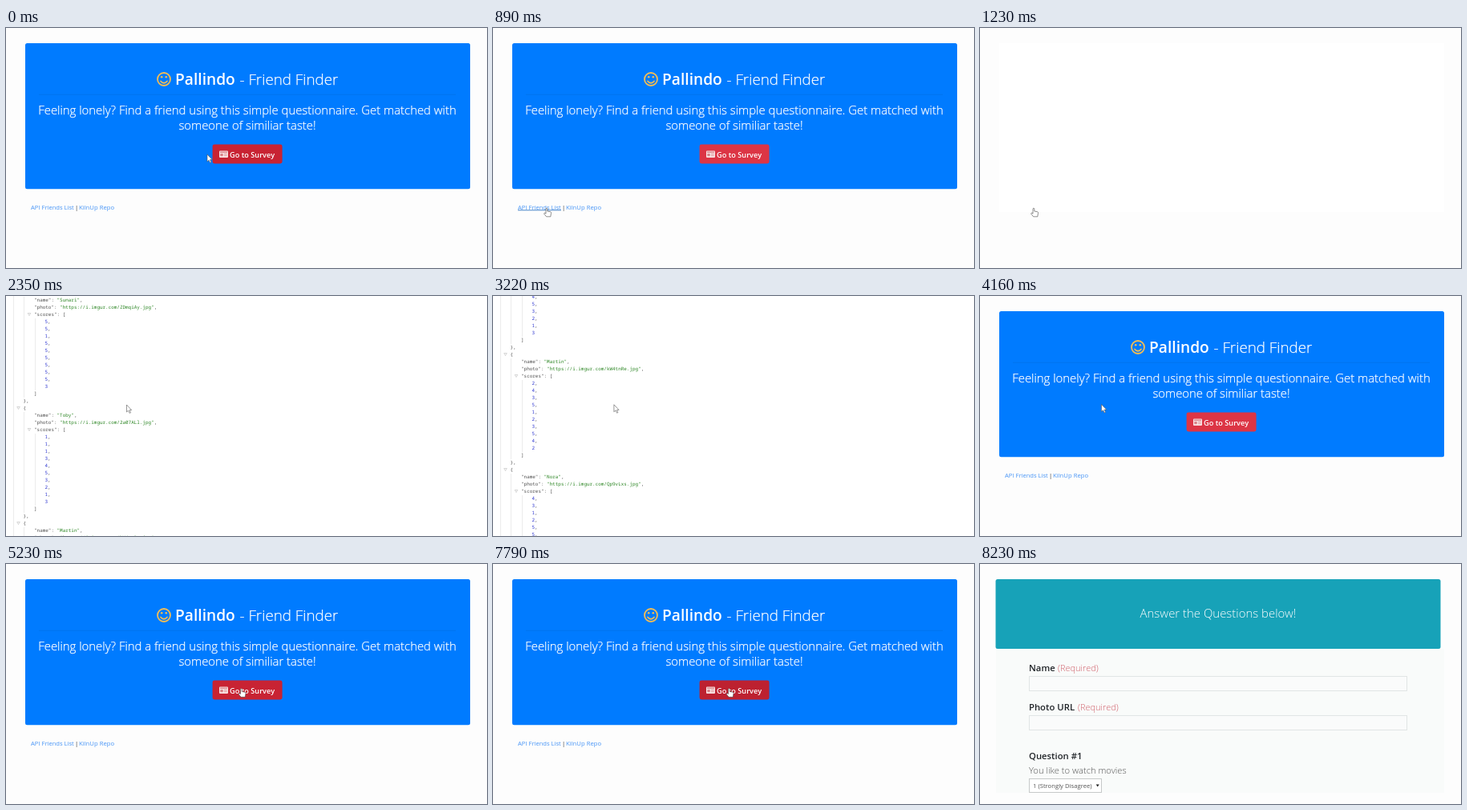
Write an HTML page that moves like this. It is 600 px wide and 300 px high and loops after 8.6 s.

```html
<!DOCTYPE html>
<html lang="en">
<head>
<meta charset="utf-8">
<title>Friend finder demo</title>
<style>
  html, body { margin: 0; width: 100%; height: 100%; overflow: hidden; background: #fdfdfd; }
  svg { display: block; width: 100%; height: 100%; }
  text { font-family: "Open Sans", "Noto Sans", sans-serif; white-space: pre; }
  .mono text {
    font-family: "Noto Sans Mono", "DejaVu Sans Mono", monospace;
    font-size: 5.95px; fill: #505050; text-rendering: geometricPrecision;
  }
  .s { fill: #2b8523; }
  .n { fill: #2c35cf; }
</style>
</head>
<body>
<svg id="stage" viewBox="0 0 600 300"></svg>
<script>
const LOOP = 8600;
const PAGE = '#fdfdfd';
const LINK = '#4694f6';

const rect = (x, y, w, h, fill, extra = '') =>
  `<rect x="${x}" y="${y}" width="${w}" height="${h}" fill="${fill}" ${extra}/>`;
const text = (x, y, size, weight, fill, str, anchor = 'start') =>
  `<text x="${x}" y="${y}" font-size="${size}" font-weight="${weight}" fill="${fill}" text-anchor="${anchor}">${str}</text>`;
const group = (id, body, extra = '') => `<g id="${id}" ${extra}>${body}</g>`;

function homePage() {
  const smiley =
    `<g fill="none" stroke="#f3bd55" stroke-width="1.8" stroke-linecap="round">
      <circle cx="197" cy="64" r="8"/><path d="M193 66.5Q197 71 201 66.5"/></g>
     <g fill="#f3bd55"><circle cx="194.2" cy="61.2" r="1.3"/><circle cx="199.8" cy="61.2" r="1.3"/></g>`;
  const icon =
    rect(266, 153.5, 11, 8.5, '#f8e4e4', 'rx="1"') +
    rect(267, 154.5, 9, 1.4, '#d98288') +
    rect(267.3, 157, 3.4, 3.2, '#d98288') +
    rect(272, 157, 3.7, .8, '#d98288') +
    rect(272, 159.3, 3.7, .8, '#d98288');
  const intro =
    text(291.5, 71, 18.8, 300, '#fff', '- Friend Finder') +
    text(301, 107.5, 14.9, 300, '#fff', 'Feeling lonely? Find a friend using this simple questionnaire. Get matched with', 'middle') +
    text(301, 126.5, 14.9, 300, '#fff', 'someone of similiar taste!', 'middle');
  return rect(0, 0, 600, 300, PAGE) +
    rect(24, 19, 555, 182.2, '#007bff', 'rx="2.5"') + smiley +
    text(211, 71, 19.2, 600, '#fff', 'Pallindo') +
    rect(41, 82.8, 520, .7, '#000', 'opacity=".1"') +
    group('intro', intro, 'stroke="#fff" stroke-width=".25"') +
    rect(257.6, 145.6, 87, 23.9, '#c82333', 'rx="2.4" id="button"') + icon +
    text(279, 161.5, 9.2, 600, '#fff', 'Go to Survey') +
    text(31, 226.5, 7.6, 400, LINK, 'API Friends List') +
    text(86, 226.5, 7.6, 400, '#333', '|') +
    text(91, 226.5, 7.7, 400, LINK, 'KilnUp Repo') +
    rect(31, 227.5, 54, .7, '#0056b3', 'id="underline"');
}

function blankPage() {
  return rect(0, 0, 600, 300, PAGE) + rect(24, 19, 555, 211, '#fff');
}

const friends = [
  ['Ned', 'bS8gqKu', '5144512541'],
  ['Sunari', 'ZDmqiAy', '5515555553'],
  ['Toby', '2a07ALl', '1113453213'],
  ['Martin', 'kW4tnRe', '2435123542'],
  ['Nora', 'Qp9vLxs', '4312554213'],
  ['Elin', 'u7HcDyo', '3521442351']
];

function jsonPage() {
  const line = (x, y, body) => `<text x="${x}" y="${y + 2.4}">${body}</text>`;
  const str = s => `<tspan class="s">"${s}"</tspan>`;
  const fold = (x, y) =>
    `<path d="M${x - 1.8} ${y - 1.5}h3.6l-1.8 3z" fill="none" stroke="#bbb" stroke-width=".6"/>`;
  const guide = (x, y, h) => rect(x, y, .7, h, '#e4e4e4');

  let out = guide(9, 7, 900) + line(8, 2, '[') + fold(2, 2);
  friends.forEach(([name, photo, scores], i) => {
    const y = 11 + i * 144;
    out += guide(22, y + 5, 126) + guide(36, y + 32, 90) +
      fold(15.5, y) + fold(29, y + 27) +
      line(21.5, y, '{') +
      line(35, y + 9, `"name": ${str(name)},`) +
      line(35, y + 18, `"photo": ${str('https://i.imgur.com/' + photo + '.jpg')},`) +
      line(35, y + 27, '"scores": [');
    [...scores].forEach((n, k) => {
      out += line(48.5, y + 36 + k * 9, `<tspan class="n">${n}</tspan>${k < 9 ? ',' : ''}`);
    });
    out += line(35, y + 126, ']') + line(21.5, y + 135, '},');
  });
  const tabs =
    rect(511.5, -2, 40.5, 12, '#f4f4f4', 'stroke="#c4c4c4" stroke-width=".8" rx="1"') +
    rect(552, -2, 40, 12, '#dcdcdc', 'stroke="#b8b8b8" stroke-width=".8" rx="1"') +
    text(531.5, 7, 6.2, 400, '#444', 'Raw', 'middle') +
    text(571.5, 7, 6.2, 400, '#444', 'Parsed', 'middle');
  return rect(0, 0, 600, 300, '#fff') +
    group('scroll', group('lines', out, 'class="mono"') + tabs);
}

function surveyPage() {
  const input = y => rect(61.5, y, 471, 18, '#fafbfb', 'stroke="#e1e5e5"');
  const label = (y, str, reqX) =>
    text(61, y, 11.3, 600, '#212529', str) +
    (reqX ? text(reqX, y, 11, 300, '#d0606a', '(Required)') : '');
  return rect(0, 0, 600, 300, PAGE) +
    rect(20, 106, 559, 180, '#f9fbfa') +
    rect(19.5, 19, 555, 87, '#17a2b8', 'rx="2.5"') +
    text(297, 67, 14.95, 300, '#fff', 'Answer the Questions below!', 'middle') +
    label(134, 'Name', 97) + input(140.5) +
    label(183, 'Photo URL', 122) + input(189.5) +
    label(244, 'Question #1') +
    text(61, 262, 11.2, 300, '#555', 'You like to watch movies') +
    rect(61.5, 268.5, 90, 17, '#fff', 'stroke="#c6c9c9"') +
    text(66, 279.8, 7.7, 400, '#555', '1 (Strongly Disagree)') +
    `<path d="M144.7 275.5h4l-2 3z" fill="#222"/>`;
}

const arrow =
  '<path d="M0 0V9L2.1 7.2L3.6 10.4L5 9.8L3.6 6.6H6.2Z" fill="#fff" stroke="#555" stroke-width=".6"/>';
const hand =
  `<path d="M0 .8Q.9-.6 1.8 .8V4L5.6 4.7Q6.8 5 6.5 6.4L5.8 10.8H.6L-2.2 7.4Q-2.4 6-1.2 6.2L0 7Z"
    fill="#fff" stroke="#444" stroke-width=".6"/>`;

document.getElementById('stage').innerHTML =
  group('home', homePage()) + group('blank', blankPage()) +
  group('json', jsonPage()) + group('survey', surveyPage()) +
  group('cursor', group('arrow', arrow) + group('hand', hand));

const el = {};
document.querySelectorAll('[id]').forEach(e => el[e.id] = e);

const show = (id, on) => el[id].setAttribute('display', on ? 'inline' : 'none');
const clamp = v => Math.max(0, Math.min(1, v));
const progress = (t, a, b) => clamp((t - a) / (b - a));
const smooth = p => p * p * (3 - 2 * p);

// [time, x, y] of the pointer tip
const path = [
  [30, 251, 158], [300, 205, 182], [620, 105, 224], [890, 66, 225],
  [1290, 66, 225], [1760, 150.5, 136], [3000, 150.5, 136], [3570, 151.5, 135.5],
  [4500, 151.5, 135.5], [4720, 226, 196], [4930, 266, 202], [5230, 292.5, 155.5],
  [7730, 292.5, 155.5], [7790, 293.5, 155.5]
];

function pointer(t) {
  let i = 0;
  while (i < path.length - 2 && t > path[i + 1][0]) i++;
  const [a, b] = [path[i], path[i + 1]];
  const p = progress(t, a[0], b[0]);
  return [a[1] + (b[1] - a[1]) * p, a[2] + (b[2] - a[2]) * p];
}

function pageAt(t) {
  if (t < 1230) return 'home';
  if (t < 1290) return 'blank';
  if (t < 4160) return 'json';
  if (t < 7910) return 'home';
  return t < 7970 ? 'blank' : 'survey';
}

function mix(a, b, p) {
  return `rgb(${a.map((v, i) => Math.round(v + (b[i] - v) * p))})`;
}

const RED = [220, 53, 69], HOVER = [200, 35, 51], ACTIVE = [189, 33, 48];

function buttonColor(t) {
  if (t < 4160) return mix(HOVER, RED, progress(t, 30, 180));
  if (t < 7700) return mix(RED, HOVER, progress(t, 5080, 5230));
  return mix(HOVER, ACTIVE, progress(t, 7700, 7790));
}

function draw(t) {
  const page = pageAt(t);
  for (const id of ['home', 'blank', 'json', 'survey']) show(id, id === page);

  const [x, y] = pointer(t);
  const onLink = page !== 'json' && x > 31 && x < 85 && y > 217 && y < 229;
  const onButton = page === 'home' && x > 258 && x < 344 && y > 146 && y < 169;
  show('cursor', page !== 'survey');
  show('hand', onLink || onButton);
  show('arrow', !(onLink || onButton));
  el.cursor.setAttribute('transform', `translate(${x.toFixed(2)} ${y.toFixed(2)})`);

  show('underline', onLink);
  el.button.setAttribute('fill', buttonColor(t));

  const scroll = 463 * (progress(t, 2200, 2640) - smooth(progress(t, 3080, 3570)));
  el.scroll.setAttribute('transform', `translate(0 ${-Math.round(scroll)})`);
}

const start = performance.now();
function tick() {
  draw((performance.now() - start) % LOOP);
  requestAnimationFrame(tick);
}
draw(0);
requestAnimationFrame(tick);
</script>
</body>
</html>
```
